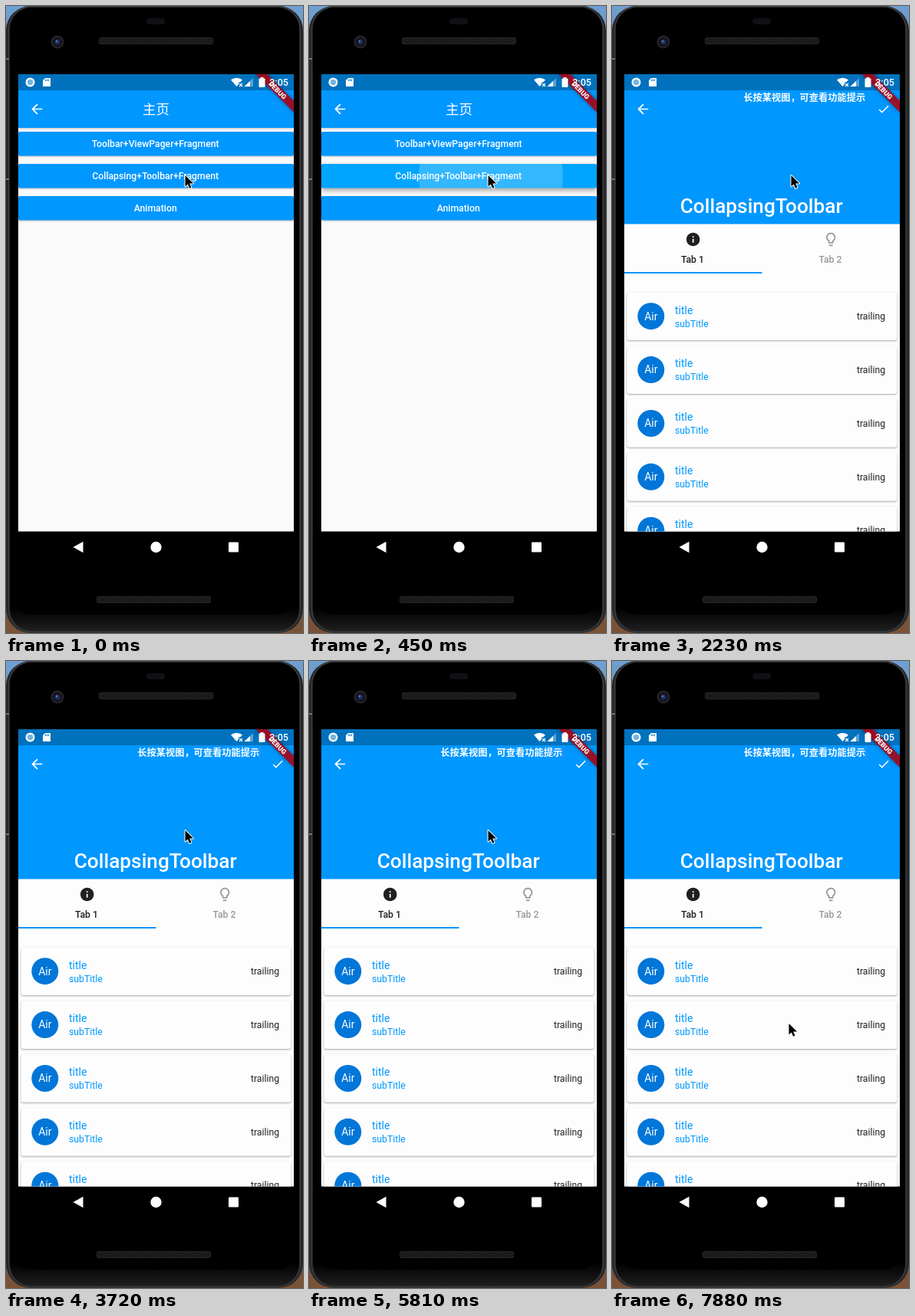
An HTML page with a canvas for the animation above (8 s loop, 387 by 818 pixels).

```html
<!DOCTYPE html>
<html lang="zh">
<head>
<meta charset="utf-8">
<style>
  html, body { margin: 0; width: 100%; height: 100%; overflow: hidden; background: #000; }
  canvas { display: block; width: 387px; height: 818px; }
</style>
</head>
<body>
<canvas id="stage"></canvas>
<script>
const W = 387, H = 818, LOOP = 8000, DP = 0.8735;
const SCREEN = { x: 16, y: 89, w: 359, h: 596.4 };
const BLUE = '#0097ff', ROBOTO = 'Roboto, sans-serif';
const CJK = '"Noto Sans CJK SC", "Noto Sans CJK", sans-serif';

const canvas = document.getElementById('stage');
const ratio = window.devicePixelRatio || 1;
canvas.width = W * ratio;
canvas.height = H * ratio;
const ctx = canvas.getContext('2d');

const ICONS = {
  back: new Path2D('M20 11H7.83l5.59-5.59L12 4l-8 8 8 8 1.41-1.41L7.83 13H20z'),
  check: new Path2D('M9 16.17L4.83 12l-1.42 1.41L9 19 21 7l-1.41-1.41z'),
  info: new Path2D('M12 2C6.48 2 2 6.48 2 12s4.48 10 10 10 10-4.48 10-10S17.52 2 12 2zm1 15h-2v-6h2v6zm0-8h-2V7h2v2z'),
  bulb: new Path2D('M9 21c0 .55.45 1 1 1h4c.55 0 1-.45 1-1v-1H9v1zm3-19C8.14 2 5 5.14 5 9c0 2.38 1.19 4.47 3 5.74V17c0 .55.45 1 1 1h6c.55 0 1-.45 1-1v-2.26c1.81-1.27 3-3.36 3-5.74 0-3.86-3.14-7-7-7zm2.85 11.1l-.85.6V16h-4v-2.3l-.85-.6C7.8 12.16 7 10.63 7 9c0-2.76 2.24-5 5-5s5 2.24 5 5c0 1.63-.8 3.16-2.15 4.1z'),
};
const POINTER = new Path2D('M0 0V14.6L3.3 11.5 5.6 16.8 8 15.8 5.7 10.6H10.6Z');

// [start ms, tip x, tip y]
const POINTER_STEPS = [
  [0, 233.5, 221], [7300, 216.5, 241], [7450, 214.5, 244],
  [7590, 214.5, 258], [7740, 215.5, 364], [7880, 230.5, 473],
];
// [start ms, radius]
const RIPPLE_STEPS = [[0, 0], [150, 38], [300, 66], [450, 94]];
const CARET_FLIPS = [1340, 1780, 2230, 2830, 3270, 3720, 4170, 4770,
  5220, 5810, 6260, 6710, 7150, 7740];
const PRESS_AT = 150, OPEN_AT = 890;

const stepAt = (steps, t) => steps.filter(step => step[0] <= t).pop();

function fillRect(x, y, w, h, color) {
  ctx.fillStyle = color;
  ctx.fillRect(x, y, w, h);
}

function fillRound(x, y, w, h, r, color) {
  ctx.beginPath();
  ctx.roundRect(x, y, w, h, r);
  ctx.fillStyle = color;
  ctx.fill();
}

function disc(x, y, r, color) {
  ctx.beginPath();
  ctx.arc(x, y, r, 0, Math.PI * 2);
  ctx.fillStyle = color;
  ctx.fill();
}

function polygon(color, ...points) {
  ctx.beginPath();
  points.forEach(([x, y]) => ctx.lineTo(x, y));
  ctx.fillStyle = color;
  ctx.fill();
}

function text(str, x, y, size, color, { weight = 400, align = 'left', font = ROBOTO } = {}) {
  ctx.font = `${weight} ${size}px ${font}`;
  ctx.textAlign = align;
  ctx.fillStyle = color;
  ctx.fillText(str, x, y);
}

function icon(name, x, y, color, scale = DP) {
  ctx.save();
  ctx.translate(x, y);
  ctx.scale(scale, scale);
  ctx.translate(-12, -12);
  ctx.fillStyle = color;
  ctx.fill(ICONS[name]);
  ctx.restore();
}

function withShadow(blur, dy, alpha, draw) {
  ctx.save();
  ctx.shadowColor = `rgba(0,0,0,${alpha})`;
  ctx.shadowBlur = blur * ratio;
  ctx.shadowOffsetY = dy * ratio;
  draw();
  ctx.restore();
}

function vertical(y0, y1, ...colors) {
  const g = ctx.createLinearGradient(0, y0, 0, y1);
  colors.forEach((c, i) => g.addColorStop(i / (colors.length - 1), c));
  return g;
}

function speaker(x, y, w) {
  fillRound(x, y, w, 9, 3, '#292929');
  fillRound(x + 1, y + 1, w - 2, 7, 2.5, '#171717');
  for (let row = 0; row < 3; row++) {
    for (let i = x + 3 + row % 2; i < x + w - 3; i += 3) {
      fillRect(i, y + 2 + row * 2, 1, 1, '#303030');
    }
  }
}

function drawPhone() {
  fillRect(0, 0, W, H, vertical(0, H, '#6f9fd0', '#4c5a68', '#7b5236'));
  fillRound(0, 0, W, H, 32, '#252627');
  ctx.lineWidth = 1.2;
  ctx.strokeStyle = '#3e3f40';
  ctx.beginPath();
  ctx.roundRect(3.5, 0.6, W - 7, H - 2, 30);
  ctx.stroke();
  fillRound(5, 2, W - 10, H - 5, 28, vertical(785, H, '#000', '#222'));
  fillRound(8, 2, W - 16, 792, 26, '#000');
  [68, 225].forEach(y => fillRect(0, y, 4, 2, '#777'));

  fillRound(183, 16, 24, 8, 4, '#101016');
  disc(67, 47, 8.5, '#242426');
  disc(67, 47, 6, '#10121a');
  disc(67, 47, 3.5, '#202d60');
  disc(66, 46, 1.2, '#6878b4');
  speaker(121, 41, 149);
  speaker(118, 770, 149);

  polygon('#fff', [87.5, 706], [100.5, 698.7], [100.5, 713.3]);
  disc(195.5, 706, 7.2, '#fff');
  fillRound(290, 699.5, 13, 13, 1, '#fff');
}

function drawStatusIcons() {
  disc(31.5, 99.5, 6, '#fff');
  disc(31.5, 99.5, 3.7, '#76b4df');
  polygon('#fff', [51, 94], [58, 94], [58, 105], [48, 105], [48, 97]);
  [51, 53, 55].forEach(x => fillRect(x, 95.5, 1, 2.5, '#0071bd'));

  ctx.beginPath();
  ctx.moveTo(300.5, 105);
  ctx.lineTo(293, 96.3);
  ctx.quadraticCurveTo(300.5, 91, 308, 96.3);
  ctx.closePath();
  ctx.fillStyle = '#fff';
  ctx.fill();
  fillRect(303, 99.5, 6, 6.5, '#0071bd');
  ctx.strokeStyle = '#fff';
  ctx.lineWidth = 1.2;
  ctx.beginPath();
  ctx.moveTo(304, 101);
  ctx.lineTo(308, 105);
  ctx.moveTo(308, 101);
  ctx.lineTo(304, 105);
  ctx.stroke();

  polygon('#5aa2d4', [322, 94], [322, 105], [310.5, 105]);
  polygon('#fff', [318, 98], [318, 105], [310.5, 105]);
  fillRound(329.5, 94.5, 8, 11.5, 1, '#fff');
  fillRect(331.5, 93, 4, 2, '#fff');
  text('3:05', 368, 104, 12.6, '#fff', { weight: 500, align: 'right' });
}

function drawBanner() {
  ctx.save();
  ctx.translate(375, 89);
  ctx.rotate(Math.PI / 4);
  withShadow(5, 0, 0.5, () => fillRect(-35, 24.5, 70, 10.5, 'rgba(165,10,32,.92)'));
  text('DEBUG', 0, 33, 8.9, '#fff', { weight: 900, align: 'center' });
  ctx.restore();
}

function drawButton(label, y, pressed, rippleRadius) {
  withShadow(pressed ? 6 : 2, pressed ? 3 : 1, pressed ? 0.35 : 0.25, () =>
    fillRound(16, y, 359, 31.4, 2, pressed ? '#00a5ff' : BLUE));
  if (rippleRadius) {
    ctx.save();
    ctx.beginPath();
    ctx.roundRect(16, y, 359, 31.4, 2);
    ctx.clip();
    disc(237, y + 16, rippleRadius, 'rgba(255,255,255,.2)');
    ctx.restore();
  }
  text(label, 194.7, y + 20.2, 14 * DP, '#fff', { weight: 500, align: 'center' });
}

function drawHome(t) {
  fillRect(16, 89, 359, 600, '#fafafa');
  withShadow(3, 1, 0.22, () => fillRect(16, 110, 359, 49, BLUE));
  icon('back', 40.3, 134.5, '#fff');
  text('主页', 195.5, 141.3, 20 * DP, '#fff', { align: 'center', font: CJK });
  drawButton('Toolbar+ViewPager+Fragment', 164, false, 0);
  drawButton('Collapsing+Toolbar+Fragment', 206, t >= PRESS_AT, stepAt(RIPPLE_STEPS, t)[1]);
  drawButton('Animation', 248, false, 0);
}

function drawCard(y) {
  withShadow(2.2, 1, 0.35, () => fillRound(19.5, y, 352, 62.8, 3.5, '#fdfdfd'));
  disc(50.8, y + 31.4, 17.5, '#0076d8');
  text('Air', 50.8, y + 36.3, 16 * DP, '#fff', { align: 'center' });
  text('title', 82, y + 28.2, 16 * DP, BLUE);
  text('subTitle', 82, y + 45.3, 14 * DP, BLUE);
  text('trailing', 356, y + 35.6, 14 * DP, '#212121', { align: 'right' });
}

function drawCollapsing(t) {
  fillRect(16, 89, 359, 600, '#fdfdfd');
  fillRect(16, 110, 359, 174.5, BLUE);
  icon('back', 40.3, 134.5, '#fff');
  icon('check', 354, 134.5, '#fff', 0.74);
  text('长按某视图，可查看功能提示', 171.3, 124.1, 14 * DP, '#fff', { weight: 700, font: CJK });
  const flips = CARET_FLIPS.filter(at => at <= t).length;
  if (flips % 2 === 0) fillRect(330, 110, 2, 18, '#2c8ef8');
  text('CollapsingToolbar', 194.7, 270.3, 30 * DP, '#fff', { weight: 500, align: 'center' });

  icon('info', 105.7, 304.5, '#202020');
  icon('bulb', 285.2, 304.5, '#999');
  text('Tab 1', 105, 335, 14 * DP, '#202020', { weight: 500, align: 'center' });
  text('Tab 2', 284.5, 335, 14 * DP, '#999', { weight: 500, align: 'center' });
  fillRect(16, 347, 179.5, 2, BLUE);
  for (let i = 0; i < 5; i++) drawCard(373.3 + i * 80 * DP);
}

function drawPointer(t) {
  const [, x, y] = stepAt(POINTER_STEPS, t);
  ctx.save();
  ctx.translate(x, y);
  ctx.lineJoin = 'round';
  ctx.lineWidth = 2;
  ctx.strokeStyle = '#fff';
  ctx.stroke(POINTER);
  ctx.fillStyle = '#000';
  ctx.fill(POINTER);
  ctx.restore();
}

function render(t) {
  ctx.setTransform(ratio, 0, 0, ratio, 0, 0);
  drawPhone();
  ctx.save();
  ctx.beginPath();
  ctx.rect(SCREEN.x, SCREEN.y, SCREEN.w, SCREEN.h);
  ctx.clip();
  (t < OPEN_AT ? drawHome : drawCollapsing)(t);
  fillRect(16, 89, 359, 21, '#0071bd');
  drawBanner();
  drawStatusIcons();
  ctx.restore();
  drawPointer(t);
}

const start = performance.now();
function tick() {
  render((performance.now() - start) % LOOP);
  requestAnimationFrame(tick);
}
tick();
</script>
</body>
</html>
```
